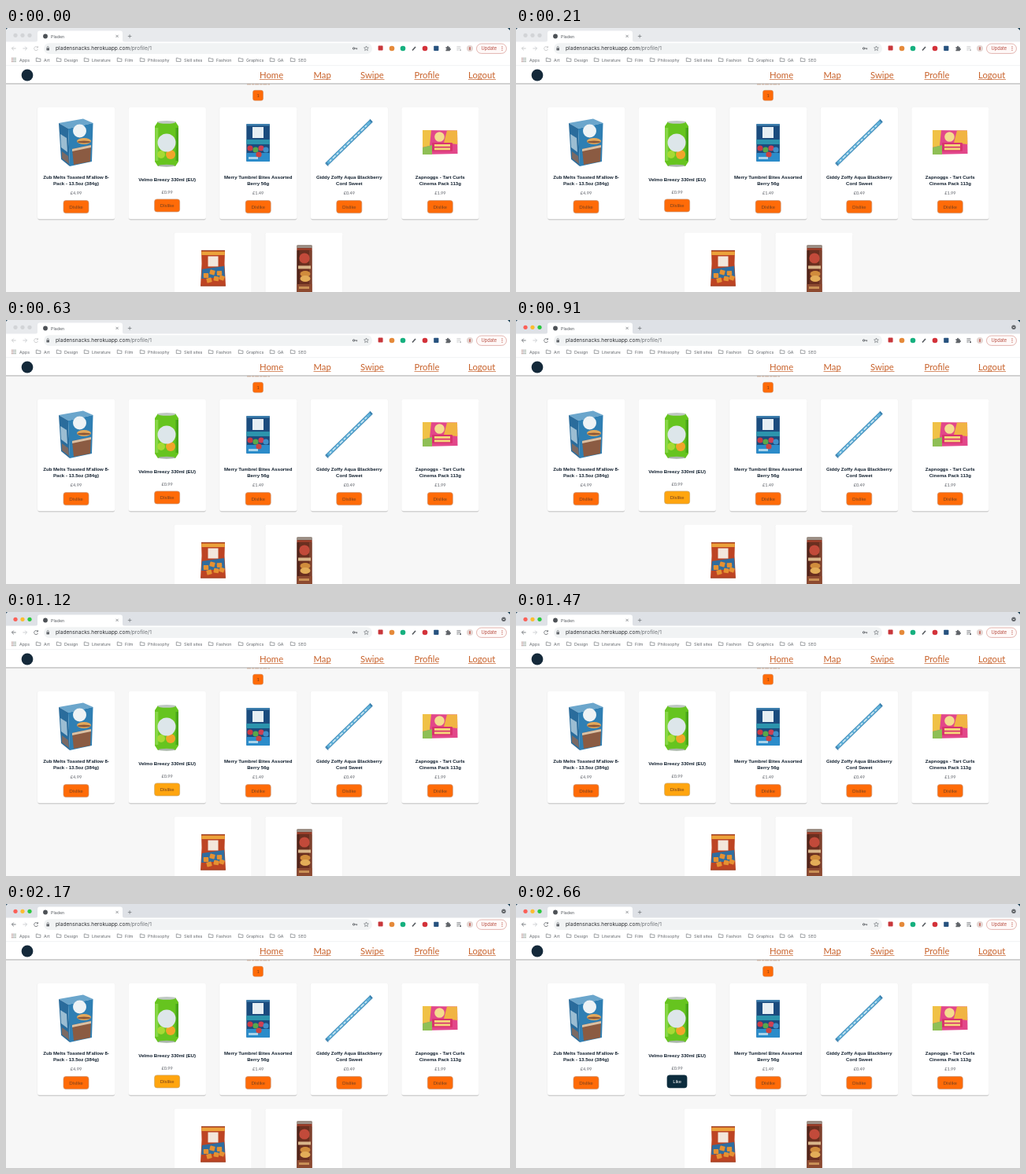
Recreate the animation shown at these times as an HTML page. Size 640 px wide and 336 px high, loop 2730 ms.

```html
<!DOCTYPE html>
<html lang="en">
<head>
<meta charset="utf-8">
<title>Snack profile</title>
<style>
html, body { margin: 0; width: 100%; height: 100%; overflow: hidden; background: #f7f7f7; }
svg { display: block; width: 100vw; height: 100vh; }
.ui { font-family: Inter, Roboto, sans-serif; }
.nav { font: 400 11.3px Lato, sans-serif; fill: #c8612a; }
.name { font: bold 6.1px "Liberation Sans", Arial, sans-serif; fill: #12202f; text-anchor: middle; }
.thin { font-family: Lato, sans-serif; text-anchor: middle; }
</style>
</head>
<body>
<svg id="stage" viewBox="0 0 640 336" xmlns="http://www.w3.org/2000/svg"></svg>
<script>
const LOOP = 2730, HOVER = 770, LIKED = 2310;
const ORANGE = "#ff6b08";
const stage = document.getElementById("stage");

const rect = (x, y, w, h, fill, r = 0, more = "") =>
  `<rect x="${x}" y="${y}" width="${w}" height="${h}" rx="${r}" fill="${fill}" ${more}/>`;
const dot = (x, y, r, fill, more = "") => `<circle cx="${x}" cy="${y}" r="${r}" fill="${fill}" ${more}/>`;
const oval = (x, y, rx, ry, fill) => `<ellipse cx="${x}" cy="${y}" rx="${rx}" ry="${ry}" fill="${fill}"/>`;
const poly = (points, fill) => `<polygon points="${points}" fill="${fill}"/>`;
const line = (d, color, w = 1, more = "") =>
  `<path d="${d}" fill="none" stroke="${color}" stroke-width="${w}" ${more}/>`;
const text = (x, y, s, cls, more = "") => `<text x="${x}" y="${y}" class="${cls}" ${more}>${s}</text>`;
const ui = (x, y, s, size, fill) => text(x, y, s, "ui", `font-size="${size}" fill="${fill}"`);

function tabStrip() {
  return rect(0, 0, 640, 18, "#dee1e6", 0, 'id="strip"') +
    poly("0,0 2,0 0,2", "#35566b") + poly("640,0 637,0 640,3", "#1d4257") +
    [12, 21, 30].map(x => dot(x, 9.3, 2.6, "#d2d4d7", 'class="light"')).join("") +
    `<path d="M37 18Q40 18 40 15V6.5Q40 3.5 43 3.5H145Q148 3.5 148 6.5V15Q148 18 151 18Z" fill="#fff"/>` +
    dot(50, 10.5, 2.9, "#4d5156") + ui(57, 12.5, "Pladen", 5.3, "#55595e") +
    line("M139.5 8.8l3.2 3.2m0-3.2l-3.2 3.2M154.8 10.5h4.6m-2.3-2.3v4.6", "#6d7176", .7) +
    `<g class="dims">${dot(632, 9.2, 2.7, "#5f6368")}${line("M630.8 8.8l1.2 1.2 1.2-1.2", "#fff", .7)}</g>`;
}

function toolbar() {
  const extras = [[490, "#e58a3a"], [504, "#16b07f"], [532, "#d3323a"]].map(([x, c]) => dot(x, 26, 3.3, c)).join("");
  return rect(0, 17.5, 640, 31, "#fff") +
    `<g class="dims">` + line("M12.6 26H7.4m2.4-2.4L7.4 26l2.4 2.4", "#5f6368", .8) +
    line("M40.2 24.7A2.5 2.5 0 1 0 40.5 27M40.5 23.2v1.8h-1.8", "#5f6368", .8) +
    line("M572.4 23.8h5m-5 2.1h5m-5 2.1h2.6", "#5f6368", .8) + dot(577, 28.2, 1.1, "#5f6368") + `</g>` +
    line("M21.4 26h5.2M24.2 23.6l2.4 2.4-2.4 2.4", "#c3c6c9", .8) +
    rect(48, 19.3, 417, 13.6, "#f1f3f4", 6.8) +
    rect(51.4, 25.4, 3.6, 3, "#5f6368", .4) + line("M52.1 25.6v-1a1.1 1.1 0 0 1 2.2 0v1", "#5f6368", .6) +
    ui(63, 28.2, 'pladensnacks.herokuapp.com<tspan fill="#6d7176">/profile/1</tspan>', 6.65, "#303236") +
    dot(441.6, 26, 1.2, "none", 'stroke="#5f6368" stroke-width="1"') +
    line("M442.8 26h3.4m-.8 0v1.3", "#5f6368", .9) +
    line("M457.5 23l.8 1.9 2.1.2-1.6 1.4.5 2.1-1.8-1.1-1.8 1.1.5-2.1-1.6-1.4 2.1-.2z", "#5f6368", .6) +
    rect(472.6, 22.6, 6, 6, "#c8363a", .8) + extras +
    line("M516 28.6l4-4.6", "#55595e", 1.6) + rect(543.2, 22.8, 6.2, 6.2, "#27527f", .8) +
    `<path d="M558.4 24.2h1.7q0-1.4 1-1.4t1 1.4h1.7v1.8q1.3 0 1.3 1t-1.3 1v1.3h-5.4v-1.7q1.1 0 1.1-.9t-1.1-.9z" fill="#5f6368"/>` +
    dot(589, 26, 4, "#e4d6d3") + rect(588.3, 24, 1.5, 4.2, "#c4584d", .7) +
    rect(597.5, 20, 38, 12.4, "#fff9f8", 6.2, 'stroke="#dba39d" stroke-width=".8"') +
    ui(603.5, 28.1, "Update", 5.7, "#b5483c") +
    [23.9, 26.2, 28.5].map(y => dot(630, y, .6, "#b5483c")).join("");
}

function bookmarks() {
  const folders = [[41, "Art"], [67, "Design"], [102, "Literature"], [144, "Film"], [173, "Philosophy"],
    [219, "Skill sites"], [260, "Fashion"], [298, "Graphics"], [338, "GA"], [364, "SEO"]];
  let out = ui(17, 42.5, "Apps", 5.3, "#63676c");
  for (let i = 0; i < 9; i++)
    out += rect(7.2 + i % 3 * 2.1, 37.8 + Math.floor(i / 3) * 2.1, 1.3, 1.3, ["#a87d78", "#8d9399", "#8a9f8f"][i % 3]);
  for (const [x, s] of folders)
    out += line(`M${x - 2.7} 38.2h2l.8.9h2.8v3.5h-5.6z`, "#6d7176", .65) + ui(x + 7, 42.5, s, 5.3, "#63676c");
  return out;
}

function navBar() {
  const links = [[322, 30, "Home"], [390.5, 22, "Map"], [450, 30.5, "Swipe"], [518.5, 31, "Profile"], [587, 35, "Logout"]];
  return rect(0, 71, 640, 1, "#dcdcdc") + rect(0, 48, 640, 22.4, "#fff") +
    rect(0, 47.6, 640, .5, "#e2e4e6") + rect(0, 70.4, 640, .8, "#b4b4b4") +
    dot(27, 60, 7.4, "#14293a") +
    links.map(([x, w, s]) => text(x, 63.7, s, "nav") + rect(x, 65.2, w, .7, "#c8612a")).join("") +
    line("M306 71.8h29", "#b98b70", .7, 'stroke-dasharray="5 1.2 3 1"') +
    rect(313.5, 79.3, 13, 13, ORANGE, 2.5, 'stroke="#c98458" stroke-width=".5"') +
    text(320, 87.8, "1", "thin", 'font-size="5.6" fill="#7b3d18"');
}

function button(x, y) {
  return rect(x - 16, y - 8, 32, 16, ORANGE, 3, 'stroke="#cb9271" stroke-width=".7"') +
    text(x, y + 2, "Dislike", "thin", 'font-size="6" fill="#74411f"');
}

function card(x, y, names, price, dy = 0) {
  const mid = x + 49;
  const out = rect(x - .5, y, 99, 143, "#ededed", 2) + rect(x + .5, y + 2, 97.5, 141.4, "#d2d2d2", 2) +
    rect(x, y, 98.3, 142, "#fff", 2);
  if (!names) return out;
  const first = names.length > 1 ? 191.7 : 195.1;
  return out + names.map((s, i) => text(mid, first + i * 8, s, "name")).join("") +
    text(mid, 212.2 + dy, price, "thin", 'font-size="5.6" fill="#5d6168"') +
    `<g ${dy ? 'id="pick"' : ""}>${button(mid, 227.6 + dy)}</g>`;
}

const snackBox = () =>
  poly("67,121 98,115.5 110.5,121 79,128", "#6ba6cc") + poly("67,121 79,128 81,176 70,167", "#2a6c9c") +
  poly("79,128 110.5,121 109,170 81,176", "#2f7fb3") + poly("69,135 77,140 78,158 70,152", "#9bbdd2") +
  dot(93.5, 131, 8.5, "#eef3f5") + oval(99, 144, 9, 4, "#e3a85b") + oval(99, 145, 8.5, 1.4, "#8a5738") +
  poly("84,154 108,149 107,170 86,174", "#8b5b42") + poly("84,154 108,149 108,152 84,157", "#dcc1a3") +
  poly("71,157 79,163 80,173 71,166", "#7b6a64");

const can = () =>
  `<path d="M193 119H215L219 125V170L215 176H193L189 170V125Z" fill="#66c41f"/>` +
  rect(189.3, 127, 4, 42, "#86d646") + rect(215.5, 127, 3.3, 42, "#48a41a") +
  oval(204, 119.8, 11.5, 1.9, "#c0c8c4") + oval(204, 175.3, 11, 1.5, "#a9b5ab") +
  dot(197, 161, 5, "#a6da34") + dot(209, 161, 6, "#f2a52a") + dot(204, 146, 11.5, "#dde6ea");

const pouch = () =>
  rect(305.3, 122, 29.6, 48, "#1b4c7e", 1) + rect(305.3, 122, 29.6, 2.6, "#3e7fae", 1) +
  rect(305.3, 142, 29.6, 6, "#2c94ad") + rect(305.3, 159, 29.6, 11, "#2b8cca", 1) + rect(313, 126, 14, 14, "#e6eef3") +
  [[310, 153, "#c93a45"], [317, 155, "#58a84b"], [324, 153, "#cf3f52"], [330, 155, "#3f8fc9"], [321, 161, "#cc4440"]]
    .map(([x, y, c]) => dot(x, y, 3.6, c)).join("") + rect(308, 164, 12, 3, "#a8d3ea");

const rope = () =>
  line("M407 173.5L464 118", "#3f86b3", 4.8) + line("M408.5 172L462.5 119.4", "#5fb2db", 3.2) +
  line("M411 169.6L460 122", "#cfe5ef", 1.6, 'stroke-dasharray="3 2.5 5 2"') +
  line("M405.8 172.4l3.4 3.4M461.9 116l3.4 3.4", "#3b80ad", 1);

const twistBox = () =>
  poly("529,130 573,130.5 573.5,160 529,161", "#e2478a") + poly("529,130 540,130 538,150 529,152", "#f0c146") +
  poly("560,130.4 573,130.5 573.3,148 556,146", "#f1b443") + poly("529,152 541,149 541,161 529,161", "#8fbf55") +
  rect(541, 146, 26, 11, "#d8346f", 1) + rect(544, 148, 20, 2.8, "#f5d77a") + rect(544, 152.5, 20, 2.8, "#f5d77a") +
  dot(550.5, 138.5, 6.3, "#f4dc8e");

const bag = () =>
  `<path d="M248 283H278L277.5 300L279 328.5H247L248.5 300Z" fill="#bd4423"/>` +
  rect(248.3, 284.5, 29.5, 4.5, "#eba23a") + poly("249,307 277,303 278,317 248,319", "#2f6d9f") +
  rect(256.5, 290.5, 13, 13, "#f3e7dc") +
  [[254, 315], [262, 311], [271, 312], [258, 321], [267, 319], [274, 318]]
    .map(([x, y]) => rect(x - 3.2, y - 3, 6.4, 6, "#e59132", .8, `transform="rotate(${x * 7 % 40 - 20} ${x} ${y})"`)).join("") +
  line("M248 283.3h30M247.3 328h31.4", "#93391f", .9);

const tube = () =>
  rect(369.5, 278, 19, 58, "#6a2f20") + rect(369, 276, 20, 4, "#9c8f86", 1.5) + rect(369.5, 280.5, 19, 2, "#a5422c") +
  rect(369.5, 283, 3, 53, "#4f2318") + rect(385, 283, 3.5, 53, "#7d402c") + dot(379, 293, 6.6, "#c24a3a") +
  rect(371, 302.5, 16, 4, "#d9b68a") + [313, 319].map(y => oval(380, y, 6.5, 4, y < 315 ? "#d08c3c" : "#e3ad58")).join("") +
  rect(369.5, 326, 19, 10, "#8d4a30") + rect(372, 329, 13, 3, "#c98f55");

stage.innerHTML = rect(0, 0, 640, 336, "#f7f7f7") + tabStrip() + toolbar() + bookmarks() + navBar() +
  card(40, 101, ["Zub Melts Toasted M'allow 8-", "Pack - 13.5oz (384g)"], "£4.99") +
  card(155.6, 101, ["Velmo Breezy 330ml (EU)"], "£0.99", -1.7) +
  card(271.2, 101, ["Merry Tumbrel Bites Assorted", "Berry 56g"], "£1.49") +
  card(386.8, 101, ["Giddy Zoffy Aqua Blackberry", "Cord Sweet"], "£0.49") +
  card(502.3, 101, ["Zapnoggs - Tart Curls", "Cinema Pack 113g"], "£1.99") +
  card(213.5, 260.5) + card(329.3, 260.5) +
  snackBox() + can() + pouch() + rope() + twistBox() + bag() + tube();

const strip = document.getElementById("strip");
const lights = [...document.querySelectorAll(".light")];
const dims = [...document.querySelectorAll(".dims")];
const [face, label] = document.getElementById("pick").children;
const lightColors = ["#fb5f57", "#fcbc2f", "#2ac840"];

// The click gives the window focus and the button its hover colour.
function draw(t) {
  const active = t >= HOVER, liked = t >= LIKED;
  strip.setAttribute("fill", active ? "#dee1e6" : "#e8eaed");
  lights.forEach((el, i) => el.setAttribute("fill", active ? lightColors[i] : "#d2d4d7"));
  dims.forEach((el, i) => el.setAttribute("opacity", active ? 1 : i ? .4 : 0));
  face.setAttribute("x", liked ? 192 : 188.6);
  face.setAttribute("width", liked ? 25 : 32);
  face.setAttribute("fill", liked ? "#0c2c3d" : active ? "#ffa50f" : ORANGE);
  face.setAttribute("stroke", liked ? "#0c2c3d" : active ? "#c9a468" : "#cb9271");
  label.setAttribute("fill", liked ? "#fff" : "#74411f");
  const word = liked ? "Like" : "Dislike";
  if (label.textContent !== word) label.textContent = word;
}

function tick(now) {
  draw(now % LOOP);
  requestAnimationFrame(tick);
}
draw(0);
requestAnimationFrame(tick);
</script>
</body>
</html>
```
